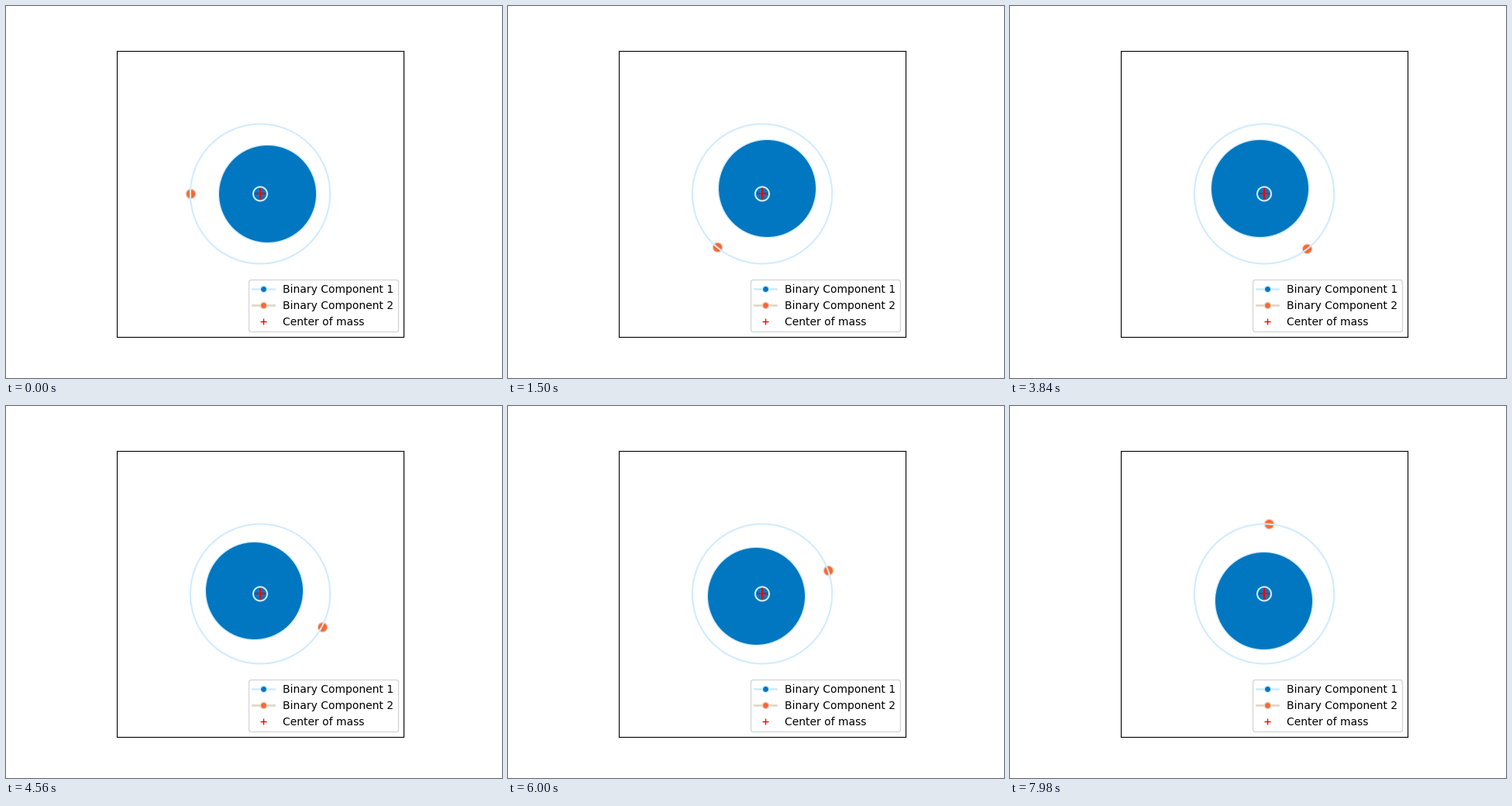
Write a matplotlib script that moves like this. It is 640x480 px and loops after 8000 ms.

```python
import numpy as np
import matplotlib.pyplot as plt
from matplotlib.animation import FuncAnimation
from matplotlib.lines import Line2D

LOOP_MS = 8000
TICK_MS = 20
STEP_MS = 30          # the pose advances one degree per step
R1, R2 = 0.1, 1.0     # orbit radii around the center of mass
LIMIT = 2.05

BLUE, ORANGE = "#0077c0", "#ff6633"
PALE_BLUE, BEIGE = "#d0ecff", "#e0d8c8"

plt.rcParams["font.family"] = "DejaVu Sans"
fig, ax = plt.subplots(figsize=(6.4, 4.8), dpi=100)
ax.set_aspect("equal")
ax.set_xlim(-LIMIT, LIMIT)
ax.set_ylim(-LIMIT, LIMIT)
ax.set_xticks([])
ax.set_yticks([])


def body(size, face, edge):
    line, = ax.plot([], [], "o", ms=size, mfc=face, mec=edge, mew=1)
    return line


def key(face, edge, label):
    return Line2D([], [], color=edge, lw=2, marker="o", ms=6,
                  mfc=face, mec=edge, mew=1, label=label)


star1 = body(91, BLUE, PALE_BLUE)
star2 = body(9, ORANGE, BEIGE)

phi = np.linspace(0, 2 * np.pi, 361)
for r in (R1, R2):
    ax.plot(r * np.cos(phi), r * np.sin(phi), color=PALE_BLUE, lw=1.5)
ax.plot([0], [0], "+", color="red", ms=10, mew=1.5)

ax.legend(handles=[
    key(BLUE, PALE_BLUE, "Binary Component 1"),
    key(ORANGE, BEIGE, "Binary Component 2"),
    Line2D([], [], ls="none", marker="+", color="red", ms=6, mew=1,
           label="Center of mass"),
], loc="lower right")


def update(tick):
    step = (tick * TICK_MS + TICK_MS // 2) // STEP_MS
    angle = np.radians(step)
    x, y = np.cos(angle), np.sin(angle)
    star1.set_data([R1 * x], [R1 * y])
    star2.set_data([-R2 * x], [-R2 * y])
    return star1, star2


anim = FuncAnimation(fig, update, frames=LOOP_MS // TICK_MS, interval=TICK_MS,
                     init_func=lambda: update(0), repeat=True, repeat_delay=0)
plt.show()
```
